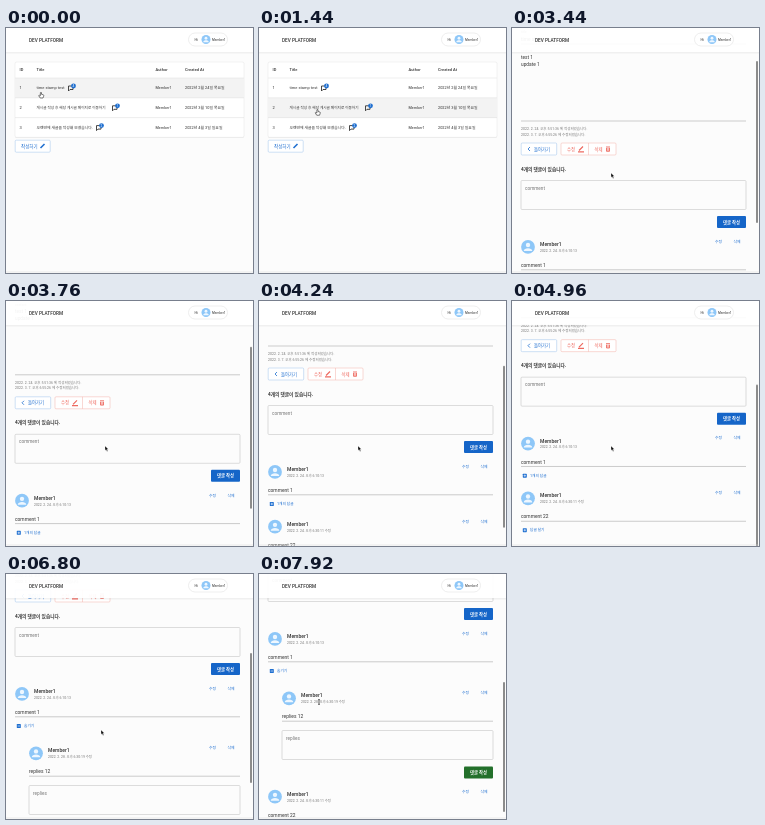
Write an HTML page that moves like this. It is 247 by 245 pixels and loops after 8000 ms.

```html
<!DOCTYPE html>
<html lang="ko">
<head>
<meta charset="utf-8">
<style>
  html, body { margin: 0; width: 100%; height: 100%; overflow: hidden; background: #fcfcfc; }
  svg { display: block; width: 247px; height: 245px; font-family: Roboto, "Noto Sans CJK KR", "Noto Sans CJK", sans-serif; }
</style>
</head>
<body>
<svg id="stage" viewBox="0 0 247 245"></svg>
<script>
const LOOP = 8000, STEP = 80, OPEN_AT = 6000, POST_AT = 1760;
const BLUE = '#1f6fd0', RED = '#ee6a60', INK = '#333', GREY = '#777';

const text = (x, mid, s, size = 4, fill = INK, weight = 400) =>
  `<text x="${x}" y="${mid + size * .36}" font-size="${size}" fill="${fill}" font-weight="${weight}">${s}</text>`;
const line = (x1, x2, y, stroke = '#999', w = .5) =>
  `<path d="M${x1} ${y}H${x2}" stroke="${stroke}" stroke-width="${w}"/>`;
const rect = (x, y, w, h, fill, stroke = 'none', r = 1) =>
  `<rect x="${x}" y="${y}" width="${w}" height="${h}" rx="${r}" fill="${fill}" stroke="${stroke}" stroke-width=".5"/>`;
const icon = (x, y, d, stroke, w = 1) =>
  `<path transform="translate(${x} ${y})" d="${d}" fill="none" stroke="${stroke}" stroke-width="${w}"/>`;
const group = (id, body) => `<g id="${id}">${body}</g>`;

const PENCIL = 'M-2 2L2 -2';
const avatar = (x, y, r) => `<g transform="translate(${x} ${y}) scale(${r / 7})">
  <circle r="7" fill="#8ec7f8"/><circle cy="-1.9" r="2.2" fill="#eef7ff"/>
  <path d="M-4.3 4.1C-4.3 .3 4.3 .3 4.3 4.1Z" fill="#eef7ff"/></g>`;

const filled = (y, fill) => rect(205, y, 29, 12, fill) + text(211, y + 6, '댓글 작성', 4.3, '#fff', 700);
const field = (x, y, label) => rect(x, y, 234 - x, 29, 'none', '#bbb') + text(x + 4, y + 7.5, label, 4.7, GREY);

function comment(x, y, name, date, body, mine) {
  return avatar(x + 7, y + 2.7, 6.9) + text(x + 19, y, name, 5, INK, 500) + text(x + 19, y + 6.4, date, 3.4, GREY) +
    (mine ? text(203, y - 2.8, '수정', 3.8, BLUE) + text(221.5, y - 2.8, '삭제', 3.8, BLUE) : '') +
    text(x, y + 21, body, 4.9) + line(x, 234, y + 25.6);
}
const toggle = (y, label, minus) => rect(10.8, y - 2, 4, 4, BLUE, 'none', .6) +
  icon(12.8, y, minus ? 'M-1.2 0H1.2' : 'M-1.2 0H1.2M0 -1.2V1.2', '#fff', .6) + text(18, y, label, 3.7, BLUE);

const rows = [
  ['time stamp test', 4, 62.5, 4, '2022년 2월 24일 목요일'],
  ['게시글 작성 후 해당 게시글 페이지로 이동하기', 3.65, 106.5, 1, '2022년 3월 10일 목요일'],
  ['오랜만에 새글을 작성해 보겠습니다.', 3.8, 90.5, 2, '2022년 4월 3일 일요일']
];
const list = rect(9, 34, 229, 76, '#0001', 'none', 1.5) + rect(9, 34, 229, 75.3, '#fff', '#e4e4e4', 1.5) +
  '<rect id="hover" x="9" y="50" width="229" height="20" fill="#f3f3f3"/>' +
  [[13.5, 'ID'], [30.5, 'Title'], [149.5, 'Author'], [179, 'Created At']].map(([x, s]) => text(x, 42, s, 4, INK, 500)).join('') +
  rows.map(([title, size, x, n, date], i) => {
    const y = 60 + i * 19.8;
    return line(9, 238, y - 10, '#ddd') + text(13.5, y, i + 1, 4) + text(30.5, y, title, size) +
      icon(x, y, 'M0 -2H4.5V1.5H1.5L0 3Z', '#333', .9) +
      `<circle cx="${x + 5}" cy="${y - 2}" r="2.4" fill="${BLUE}"/>` + text(x + 4.1, y - 2, n, 3.2, '#fff') +
      text(149.5, y, 'Member1', 3.8) + text(179, y, date, 3.9);
  }).join('') +
  rect(9.2, 112.2, 35, 12, '#fff', '#9dc0ea') + text(15, 118, '작성하기', 4.5, BLUE) + icon(36.5, 118, PENCIL, BLUE, 1.6);

const post = text(9, 38, 'Post Page', 9.9) +
  text(9, 54, 'title', 3.4, GREY) + text(9, 61, 'time stamp test', 4.8) + line(9, 234, 66) +
  text(9, 72.5, 'content', 3.4, GREY) + text(9, 79, 'test 1', 4.8) + text(9, 86, 'update 1', 4.8) + line(9, 234, 143) +
  text(9, 151, '2022. 2. 24. 오후 5:51:36 에 작성되었습니다.', 3.5, GREY) +
  text(9, 156.4, '2022. 3. 7. 오후 6:55:26 에 수정되었습니다.', 3.5, GREY) +
  rect(9.2, 165, 35.5, 12, '#fff', '#9dc0ea') + icon(17, 171, 'M1 -2L-1 0L1 2', BLUE, .8) + text(22, 171, '돌아가기', 4.4, BLUE) +
  rect(49, 165, 55, 12, '#fff', '#f3b0a8') + icon(76.5, 171, 'M0 -6V6', '#f3b0a8', .5) +
  text(55, 171, '수정', 4.4, RED) + icon(69, 170.5, PENCIL + 'M-3 3.3H3', RED, 1.2) +
  text(82.5, 171, '삭제', 4.4, RED) + icon(96, 171, 'M-2 -2H2M-1.5 -1V2.3H1.5V-1M0 -1V2', RED, .9) +
  text(9, 191, '4개의 댓글이 있습니다.', 4.7, INK, 700) +
  field(9, 202.5, 'comment') + filled(238, '#1565c8') +
  comment(9, 266.2, 'Member1', '2022. 2. 24. 오후 6:10:13', 'comment 1', true) +
  group('closed', toggle(301, '1개의 답글')) +
  group('opened', toggle(301, '숨기기', true) +
    comment(23, 325.6, 'Member1', '2022. 2. 28. 오후 6:30:19 수정', 'replies 12', true) +
    field(23, 360.5, 'replies') + filled(396.5, '#23702b')) +
  group('later',
    comment(9, 321, 'Member1', '2022. 2. 24. 오후 6:30:11 수정', 'comment 22', true) + toggle(355.5, '답글 달기') +
    comment(9, 375.8, 'Member2', '2022. 2. 25. 오후 4:23:23', 'comment 3', false));

const header = '<rect y="24" width="247" height="1.5" fill="#0000000c"/><rect width="247" height="24" fill="#fffffff0"/>' +
  text(23, 12, 'DEV PLATFORM', 4.7, INK, 500) + rect(182.5, 5, 39, 13, '#fff', '#ddd', 6.5) +
  text(188.5, 11.7, 'Hi', 3.6) + avatar(200, 11.5, 4.5) + text(206, 11.7, 'Member1', 3.2);

const pointers =
  '<path id="arrow" d="M0 0V4.6L1.1 3.6L2 5.4L2.8 5L2 3.3H3.4Z" fill="#111" stroke="#fff" stroke-width=".3"/>' +
  '<path id="hand" d="M-.6 -2.4Q0 -3 .5 -2.4V-.7L2.4 -.2Q3 .2 2.6 1.4L2 3H-.8L-2.3 .6Q-2 -.2 -.6 .7Z" fill="#fff" stroke="#222" stroke-width=".6"/>' +
  '<path id="beam" d="M-1 -2.5Q0 -2.5 0 -1.8Q0 -2.5 1 -2.5M0 -1.8V1.8M-1 2.5Q0 2.5 0 1.8Q0 2.5 1 2.5" fill="none" stroke="#222" stroke-width=".7"/>';

const $ = id => document.getElementById(id);
$('stage').innerHTML = '<rect width="247" height="245" fill="#fcfcfc"/>' + group('list', list) + group('post', post) + header +
  '<rect id="bar" x="244" width="2" rx="1" fill="#8c8c8c"/>' + line(0, 247, 244, '#d5d5d5') + group('cursor', pointers);

// [time, value...] stops, eased between neighbours
const path = [[0, 35, 67], [80, 35, 67], [400, 55, 80], [1040, 55, 80], [1200, 58, 92], [1360, 58, 92], [1600, 60, 62],
  [1840, 60, 62], [2400, 60, 98], [2640, 60, 98], [2960, 99, 145], [4960, 99, 145], [5440, 27, 155], [6080, 27, 155],
  [6480, 95, 156], [7760, 95, 156], [7920, 60, 128]];
const scrolls = [[2880, 0], [3440, 50], [4240, 98], [4560, 98], [5280, 149], [6800, 149], [7120, 204]];
const smooth = p => p * p * (3 - 2 * p), steady = p => p;

function at(stops, t, ease) {
  const i = stops.findIndex(s => s[0] > t);
  if (i < 0) return stops.at(-1).slice(1);
  if (!i) return stops[0].slice(1);
  const a = stops[i - 1], b = stops[i], p = ease((t - a[0]) / (b[0] - a[0]));
  return a.slice(1).map((v, k) => v + (b[k + 1] - v) * p);
}
const show = (id, on) => $(id).setAttribute('display', on ? 'inline' : 'none');
const move = (id, x, y) => $(id).setAttribute('transform', `translate(${x} ${y})`);

function pointerKind(t) {
  if (t < POST_AT || (t >= 5360 && t < 6160)) return 'hand';
  return t < 2720 || t >= 7920 ? 'beam' : 'arrow';
}

function draw(t) {
  const [x, y] = at(path, t, smooth), [s] = at(scrolls, t, steady);
  const inPost = t >= POST_AT, open = t >= OPEN_AT;
  show('list', !inPost);
  show('post', inPost);
  show('bar', inPost);
  show('closed', !open);
  show('opened', open);
  $('hover').setAttribute('y', 50 + 19.8 * Math.max(0, Math.min(2, Math.floor((y - 50) / 19.8))));
  move('post', 0, -s);
  move('later', 0, open ? 103 : 0);
  $('bar').setAttribute('y', s * (open ? .53 : .66));
  $('bar').setAttribute('height', open ? 130 : 162);
  move('cursor', x, y);
  for (const kind of ['arrow', 'hand', 'beam']) show(kind, kind === pointerKind(t));
}

const start = performance.now();
function tick() {
  const t = (performance.now() - start) % LOOP;
  draw(Math.floor(t / STEP) * STEP);
  requestAnimationFrame(tick);
}
tick();
</script>
</body>
</html>
```
